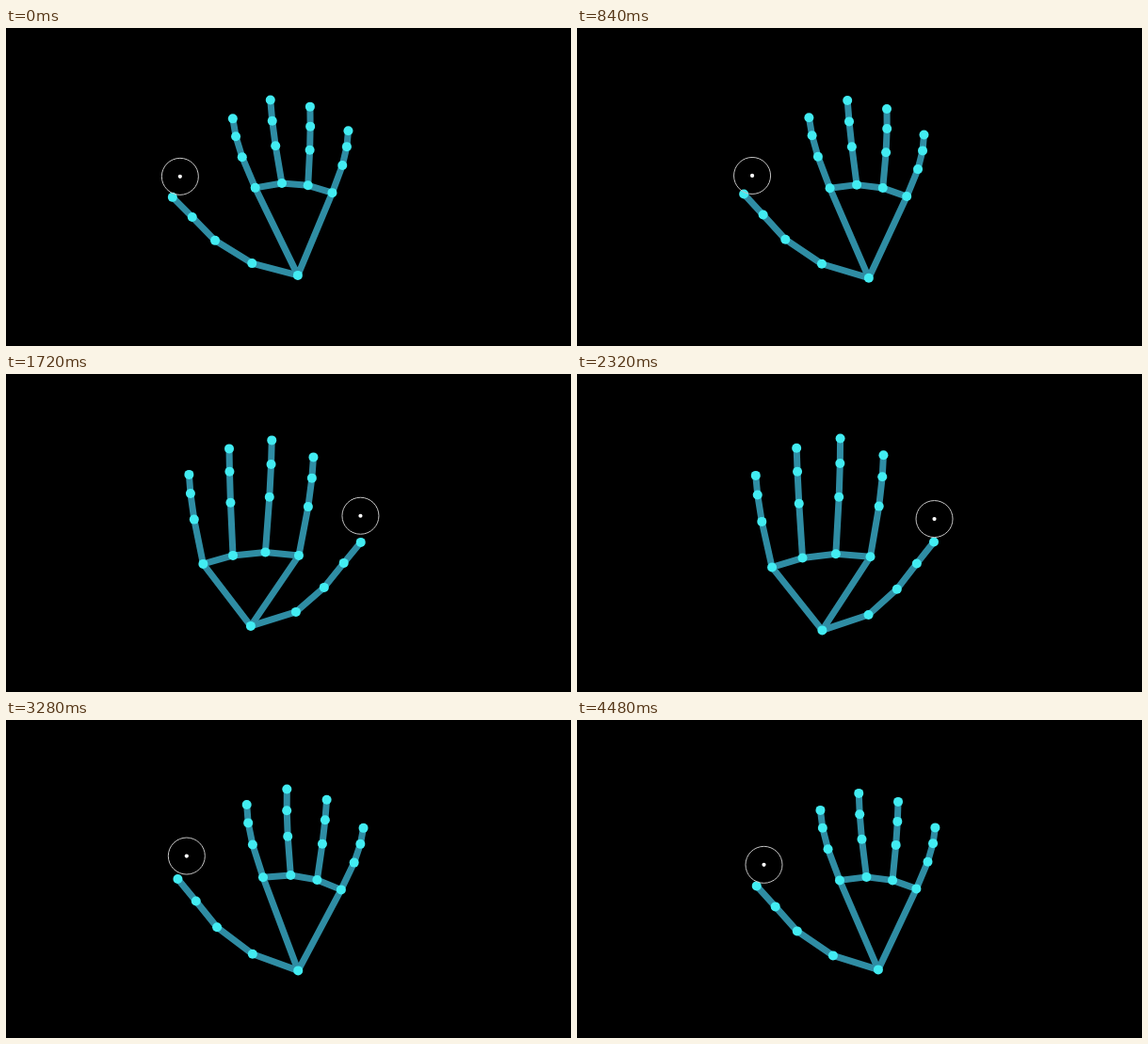
An HTML page with a canvas that plays this animation: 600 by 338 pixels, repeating every 4520 ms.

```html
<!DOCTYPE html>
<html lang="en">
<head>
<meta charset="utf-8">
<title>Hand tracking</title>
<style>
  html, body { margin: 0; width: 100%; height: 100%; overflow: hidden; background: #000; }
  canvas { display: block; }
</style>
</head>
<body>
<canvas id="stage" width="600" height="338"></canvas>
<script>
const ctx = document.getElementById('stage').getContext('2d');
const LOOP = 4520, STEP = 40, RAD = Math.PI / 180;

// Time, wrist x and y, turn about the forearm, roll in the picture plane, scale.
const keys = [
  [0,    309.5, 262.5,   0, -2.6, 1],
  [480,  308.5, 264.5,   0, -1.8, 1.01],
  [800,  311,   266.5,   0, -1,   1.01],
  [1000, 290,   255,    85,  6,   0.97],
  [1200, 271.5, 255.5, 170, -5.2, 0.95],
  [1360, 267,   260,   180, -5,   0.98],
  [1720, 259.5, 267.5, 180,  0,   1],
  [2160, 260,   272,   180, -1.5, 1.03],
  [2480, 260,   272,   180,  0,   1.03],
  [2880, 272.5, 267,    65, 15.6, 1.04],
  [3140, 308,   266.5,   0,  3,   1.03],
  [3720, 313,   264.5,   0,  2.3, 1.01],
  [4480, 319.5, 265,     0,  0,   1]
];

const thumb = [[48, 15], [82, 41], [104, 67], [123, 89]];
const fingers = [
  { x: -46, y: 85, lean: -18, length: 89.5 },
  { x: -14, y: 88.5, lean: -7.5, length: 104 },
  { x: 17, y: 85, lean: 5, length: 98.5 },
  { x: 45.5, y: 76, lean: 17.5, length: 80 }
];
const knuckles = [0, 0.475, 0.77, 1];

// Monotone cubic interpolation: smooth, without overshoot.
function slope(k, i) {
  if (k < 1 || k > keys.length - 2) return 0;
  const [a, b, c] = keys.slice(k - 1, k + 2);
  const p = (b[i] - a[i]) / (b[0] - a[0]), q = (c[i] - b[i]) / (c[0] - b[0]);
  return p * q > 0 ? 2 * p * q / (p + q) : 0;
}

function sample(time) {
  let k = 0;
  while (k < keys.length - 2 && time >= keys[k + 1][0]) k++;
  const a = keys[k], b = keys[k + 1];
  const d = b[0] - a[0], u = Math.min(1, (time - a[0]) / d), w = 1 - u;
  return a.map((v, i) =>
    v * (1 + 2 * u) * w * w + b[i] * u * u * (3 - 2 * u) +
    d * u * w * (slope(k, i) * w - slope(k + 1, i) * u));
}

// Returns the wrist, the thumb and the four fingers as points on the stage.
function pose(time) {
  const [, wx, wy, turn, roll, scale] = sample(time);
  const c = Math.cos(turn * RAD), s = Math.sin(turn * RAD);
  const cr = Math.cos(roll * RAD) * scale, sr = Math.sin(roll * RAD) * scale;

  // spread: change of width with facing, so near parts look larger
  const place = (x, y, z, spread) => {
    const px = x * c * (1 + spread * c) + z * s;
    return [wx + px * cr - y * sr, wy + y * cr + px * sr];
  };

  return {
    facing: c,
    wrist: [wx, wy],
    thumb: thumb.map(([x, y], j) => place(-x, -y, -17 - 4.3 * j, j ? 0.05 : 0)),
    fingers: fingers.map(f => knuckles.map(t => {
      const bend = 1 - (1 - t) ** 1.5;
      const lift = (15 * bend - 10) * c;
      return place(f.x + f.lean * bend, lift - f.y - f.length * t, -14 * t ** 3, 0.07 * bend - 0.11);
    }))
  };
}

// The cursor trails the thumb tip: a fading average of its recent places.
function cursor(time) {
  let x = 0, y = 0, total = 0;
  for (let age = 0; age <= 600; age += 20) {
    const { thumb, facing } = pose(Math.max(0, time - age));
    const weight = Math.exp(-age / 130);
    x += weight * (thumb[3][0] + 4.5 + 3.5 * facing);
    y += weight * (thumb[3][1] - 23 + facing);
    total += weight;
  }
  return [x / total, y / total];
}

function line(points) {
  ctx.beginPath();
  for (const p of points) ctx.lineTo(...p);
  ctx.stroke();
}

function circle([x, y], r) {
  ctx.beginPath();
  ctx.arc(x, y, r, 0, Math.PI * 2);
}

function dot(point, r) {
  circle(point, r);
  ctx.fill();
}

ctx.translate(0.4, 0.4);
ctx.lineJoin = 'round';

function draw(time) {
  const { wrist, thumb, fingers } = pose(time);
  ctx.fillStyle = '#000';
  ctx.fillRect(-1, -1, 602, 340);

  ctx.strokeStyle = '#2f8da4';
  ctx.lineWidth = 7;
  line([wrist, ...thumb]);
  line([wrist, ...fingers.map(f => f[0]), wrist]);
  fingers.forEach(line);

  ctx.fillStyle = '#42ecf2';
  for (const joint of [wrist, ...thumb, ...fingers.flat()]) dot(joint, 5);

  const spot = cursor(time);
  ctx.strokeStyle = '#c4c4c4';
  ctx.lineWidth = 1;
  circle(spot, 19.5);
  ctx.stroke();
  ctx.fillStyle = '#fff';
  dot(spot, 2.1);
}

const start = performance.now();
function tick() {
  const time = (performance.now() - start) % LOOP;
  draw(Math.floor(time / STEP) * STEP);
  requestAnimationFrame(tick);
}
tick();
</script>
</body>
</html>
```
